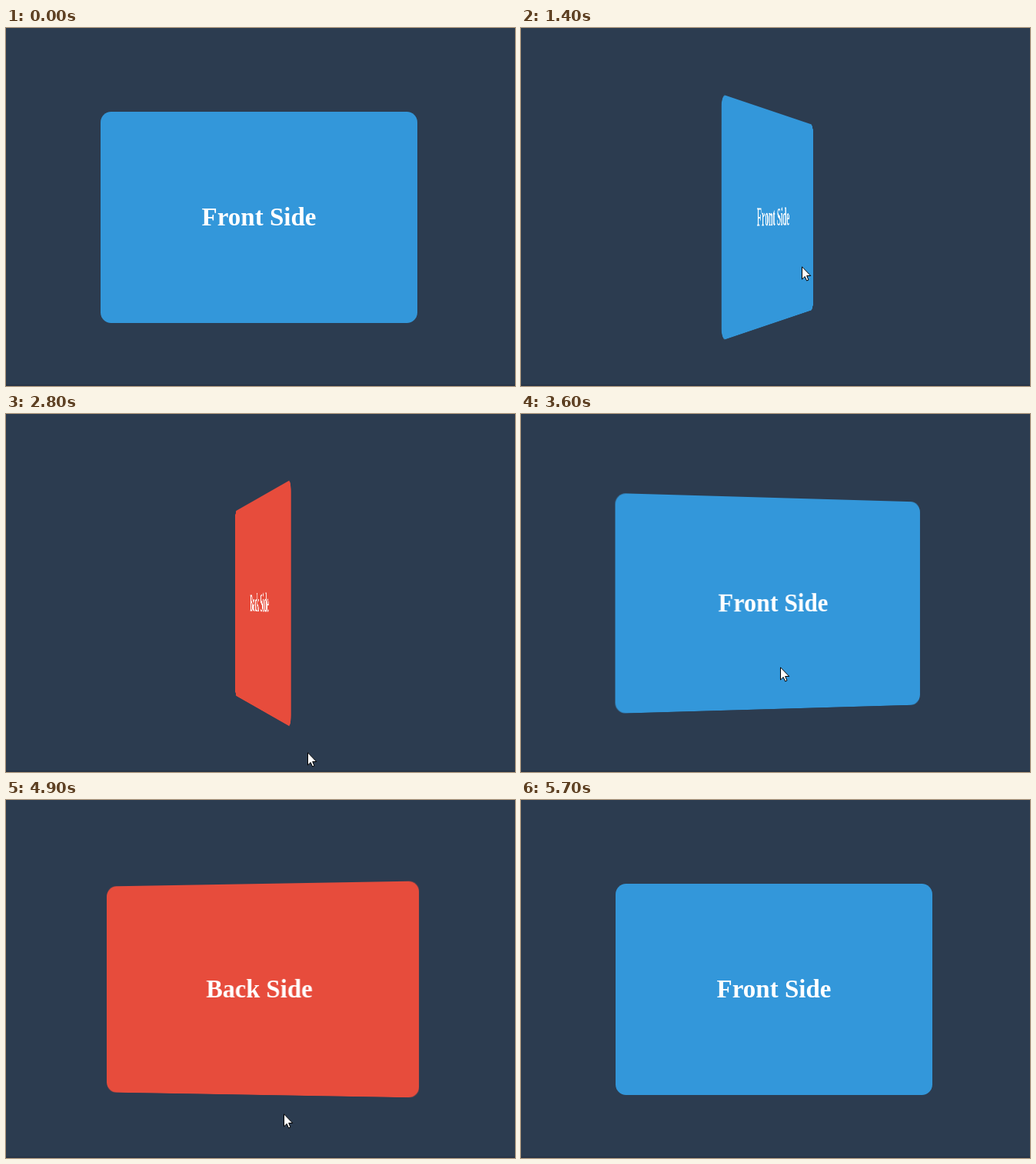
Write an HTML page that moves like this. It is 662 px wide and 466 px high and loops after 6.9 s.

```html
<!DOCTYPE html>
<html lang="en">
<head>
<meta charset="utf-8">
<title>Flip card</title>
<style>
  html, body { margin: 0; width: 100%; height: 100%; overflow: hidden; background: #2c3c50; }
  #stage { position: absolute; left: 0; top: 0; width: 662px; height: 466px; overflow: hidden; }
  #edge { position: absolute; left: 0; bottom: 0; width: 100%; height: 2px; background: #283547; }
  #scene { position: absolute; left: 123px; top: 109px; width: 412px; height: 275px; perspective: 1373px; }
  #card { position: absolute; inset: 0; transform-style: preserve-3d; }
  .face {
    position: absolute; inset: 0; border-radius: 13.7px; backface-visibility: hidden;
    display: flex; align-items: center; justify-content: center;
    color: #fff; font: bold 33px "Liberation Serif", "Times New Roman", serif;
  }
  .front { background: #3397da; }
  .back { background: #e74c3c; transform: rotateY(180deg); }
  #cursor { position: absolute; left: 0; top: 0; }
</style>
</head>
<body>
<div id="stage">
  <div id="edge"></div>
  <div id="scene">
    <div id="card">
      <div class="face front">Front Side</div>
      <div class="face back">Back Side</div>
    </div>
  </div>
  <svg id="cursor" width="13" height="21">
    <path d="M.5.8V17L4.2 13.5 6.6 19 9 18 6.7 12.5H11.8Z" fill="#fff" stroke="#000"/>
  </svg>
</div>
<script>
const LOOP = 6900, STEP = 100, FLIP = 600;
const SHOW = 1100, HIDE = 5700;
const card = document.getElementById('card');
const cursor = document.getElementById('cursor');

// The pointer enters and leaves the card in turn, turning it over and back
const flips = [1250, 2640, 3542, 4858];

// Pointer moves: start, end, x and y to reach
const home = [374, 428];
const moves = [
  [1100, 1400, 365, 310],
  [2270, 2800, 392, 440],
  [3400, 3600, 337, 329],
  [4600, 5000, 365, 423]
];

const clamp = x => Math.min(1, Math.max(0, x));
const smooth = x => x * x * (3 - 2 * x);
const mix = (a, b, k) => a + (b - a) * k;
const bezier = (a, b, s) => 3 * a * s * (1 - s) ** 2 + 3 * b * s * s * (1 - s) + s ** 3;

// CSS "ease": cubic-bezier(.25, .1, .25, 1)
function ease(x) {
  let lo = 0, hi = 1;
  for (let i = 0; i < 24; i++) {
    const mid = (lo + hi) / 2;
    if (bezier(.25, .25, mid) < x) lo = mid; else hi = mid;
  }
  return bezier(.1, 1, hi);
}

const angleAt = t => flips.reduce(
  (angle, start, i) => angle + (i % 2 ? -180 : 180) * ease(clamp((t - start) / FLIP)), 0);

const pointAt = t => moves.reduce(([px, py], [start, end, x, y]) => {
  const k = smooth(clamp((t - start) / (end - start)));
  return [mix(px, x, k), mix(py, y, k)];
}, home).map(Math.round);

function draw(now) {
  const t = Math.floor(now % LOOP / STEP) * STEP;
  const [x, y] = pointAt(t);
  card.style.transform = `rotateY(${angleAt(t)}deg)`;
  cursor.style.transform = `translate(${x}px, ${y}px)`;
  cursor.style.display = t >= SHOW && t < HIDE ? 'block' : 'none';
}

let origin;
function tick(now) {
  origin ??= now;
  draw(now - origin);
  requestAnimationFrame(tick);
}
draw(0);
requestAnimationFrame(tick);
</script>
</body>
</html>
```
